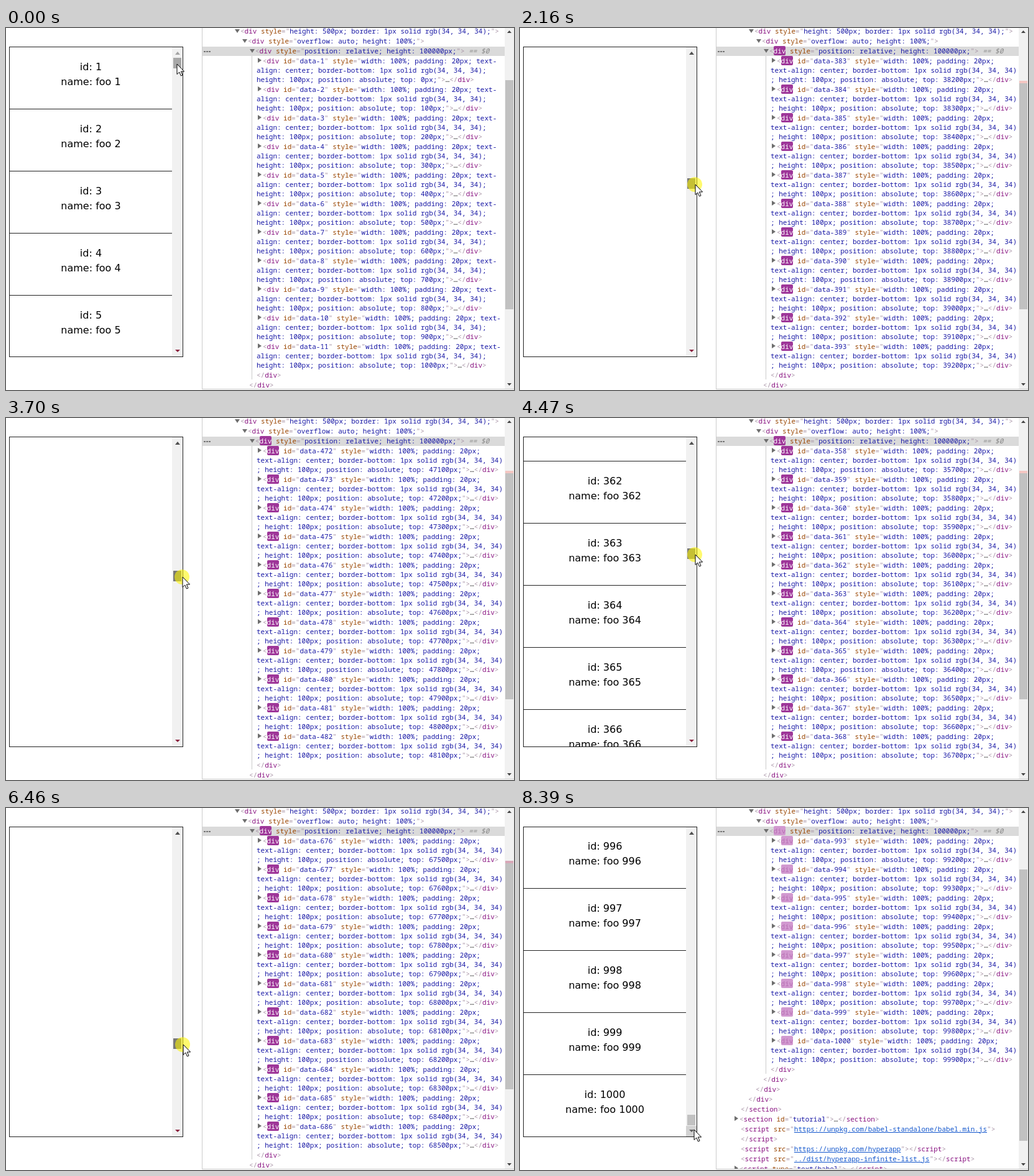
These frames come from a looping animation (817 by 583 pixels, 8460 ms). An HTML page:

```html
<!DOCTYPE html>
<html lang="en">
<head>
<meta charset="utf-8">
<title>Infinite list</title>
<style>
html, body { margin: 0; width: 100%; height: 100%; overflow: hidden; background: #fff; }
div, i, svg { position: absolute; box-sizing: border-box; }
b, em { font-weight: normal; }
#list { left: 5px; top: 30px; width: 280px; height: 500px; border: 1px solid #222; overflow: hidden; }
.row { left: 0; width: 261px; height: 100px; padding-top: 20px; border-bottom: 1px solid #222;
  font: 16px/24px "DejaVu Sans", Verdana, sans-serif; text-align: center; color: #000; }
#track { left: 261px; top: 0; width: 17px; height: 498px; background: #f1f1f1; }
#thumb { left: 2px; width: 13px; height: 17px; }
#tree { left: 315px; top: -1px; width: 502px; height: 583px; border: 1px solid #ccc; border-right: 0; overflow: hidden; }
#code { left: -316px; top: 0; width: 817px; height: 583px;
  font: 11px/15px "Noto Sans Mono", "DejaVu Sans Mono", monospace; }
.line { white-space: pre; color: #222; }
.p { color: #a894a6; } .t { color: #881280; } .a { color: #994500; } .v { color: #1a1aa6; }
.u { color: #1155cc; text-decoration: underline; }
.hot { border-radius: 2px; color: var(--ink); background: var(--glow); }
.line em { color: #888; }
.up { clip-path: polygon(50% 0, 100% 100%, 0 100%); }
.down { clip-path: polygon(0 0, 100% 0, 50% 100%); }
.right { clip-path: polygon(0 0, 100% 50%, 0 100%); }
#bar { left: 486px; top: 0; width: 16px; height: 582px; background: #f1f1f1; }
#halo { width: 24px; height: 24px; border-radius: 50%; background: rgba(255, 246, 0, .57); }
</style>
</head>
<body>
<div id="list">
  <div id="rows"></div>
  <div id="track">
    <div id="button" style="left:0;top:481px;width:17px;height:17px"></div>
    <i id="up" class="up" style="left:5px;top:7px;width:8px;height:5px"></i>
    <i id="down" class="down" style="left:5px;top:487px;width:8px;height:4px"></i>
    <div id="thumb"></div>
  </div>
</div>
<div id="tree">
  <div id="code"></div>
  <div id="bar">
    <i class="up" style="left:4px;top:4px;width:7px;height:4px;background:#444"></i>
    <i class="down" style="left:4px;top:572px;width:7px;height:4px;background:#444"></i>
    <div id="hint" style="left:1px;top:85px;width:13px;height:5px"></div>
    <div id="grip" style="left:1px;width:13px;background:#c1c1c1"></div>
  </div>
</div>
<div id="halo"></div>
<svg id="arrow" width="14" height="22" viewBox="-1 -1 14 22">
  <path d="M0 0V16.5L3.8 13L6.4 19L9 17.9L6.4 12H11.6Z" fill="#fff" stroke="#000"/>
</svg>
<script>
const LOOP = 8460, STEP = 230 / 3, SIZE = 1000, END = 995.01;

// [time, scroll position in rows]
const scrollKeys = [
  [320, 0], [1247, 233.8], [1400, 242.63], [2780, 552.4], [2933.3, 554.27],
  [4313, 360.9], [4466.7, 360.61], [4770, 362], [5003, 362], [5540, 523.5],
  [5616.7, 538.5], [5693.3, 545.36], [7073.3, 877.5], [7150, 890.5],
  [7226.7, 892.62], [7840, END]
];
const pointerKeys = [
  [320, 275], [1400, 277], [2933.3, 285], [4466.7, 282], [5693.3, 284], [7226.7, 285], [8200, 280]
];
const $ = id => document.getElementById(id);
const mix = (a, b, p) => a + (b - a) * p;
const rgb = (a, b, p) => `rgb(${a.map((x, i) => Math.round(mix(x, b[i], p)))})`;
const unit = x => Math.min(1, Math.max(0, x));

// Monotone cubic interpolation
function curve(keys, t) {
  const last = keys.length - 1;
  if (t <= keys[0][0]) return keys[0][1];
  if (t >= keys[last][0]) return keys[last][1];
  const slope = i => (keys[i + 1][1] - keys[i][1]) / (keys[i + 1][0] - keys[i][0]);
  const tangent = i => {
    if (i === 0 || i === last) return 0;
    const a = slope(i - 1), b = slope(i);
    return a * b > 0 ? 2 * a * b / (a + b) : 0;
  };
  const i = keys.findIndex(k => k[0] > t) - 1;
  const [t0, y0] = keys[i], [t1, y1] = keys[i + 1], h = t1 - t0, u = (t - t0) / h, w = 1 - u;
  return y0 * w * w * (1 + 2 * u) + y1 * u * u * (3 - 2 * u)
    + h * u * w * (tangent(i) * w - tangent(i + 1) * u);
}
const scrollAt = t => curve(scrollKeys, t);
const firstRow = t => Math.max(0, Math.floor(scrollAt(t)) - 3);
const treeRow = t => firstRow(t - 2 * STEP);
const indices = first => Array.from({ length: Math.min(11, SIZE - first) }, (_, i) => first + i);

const span = (kind, text) => `<b class="${kind}">${text}</b>`;
const attr = (name, value, kind = 'v') =>
  ' ' + span('a', name) + span('p', '="') + span(kind, value) + span('p', '"');
const open = (name, attrs, kind = 't') => span('p', '&lt;') + span(kind, name) + attrs + span('p', '&gt;');
const close = name => span('p', '&lt;/') + span('t', name) + span('p', '&gt;');
const line = (x, y, html, indent = 0) =>
  `<div class="line" style="left:${x}px;top:${y - 8}px;text-indent:${indent}px">${html}</div>`;
const mark = (x, y, isOpen) => isOpen
  ? `<i class="down" style="left:${x - 9}px;top:${y - 3}px;width:8px;height:6px;background:#6e6e6e"></i>`
  : `<i class="right" style="left:${x - 8}px;top:${y - 5}px;width:6px;height:8px;background:#6e6e6e"></i>`;
const node = (x, y, html, isOpen) => mark(x, y, isOpen) + line(x, y, html);
const box = (x, y, w, h, color) =>
  `<i style="left:${x}px;top:${y}px;width:${w}px;height:${h}px;background:${color}"></i>`;

function item(index, y, kind) {
  const id = index + 1, wide = id >= 100;
  const style = 'width: 100%; padding: 20px; ' + (wide ? '\ntext-align' : 'text-\nalign')
    + ': center; border-bottom: 1px solid rgb(34, 34, 34)' + (wide ? '\n; ' : ';\n')
    + `height: 100px; position: absolute; top: ${index * 100}px;`;
  return mark(413, y) + line(403, y,
    open('div', attr('id', 'data-' + id) + attr('style', style), kind) + '…' + close('div'), 10);
}

function treeHtml(first, kind) {
  const script = src => open('script', attr('src', src, 'u'));
  const items = indices(first);
  let y = 53 + 46 * items.length;
  let html = box(316, 30, 486, 15, '#dadada') + box(395, 45, 1, y - 38, '#ccc')
    + [0, 4, 8].map(d => box(318 + d, 37, 3, 2, '#777')).join('')
    + node(377, 5, open('div', attr('style', 'height: 500px; border: 1px solid rgb(34, 34, 34);')), true)
    + node(389, 21, open('div', attr('style', 'overflow: auto; height: 100%;')), true)
    + node(401, 37, open('div', attr('style', 'position: relative; height: 100000px;'), kind)
      + '<em> == $0</em>', true)
    + items.map((index, i) => item(index, 53 + 46 * i, kind)).join('');
  const put = (x, text) => { html += line(x, y, text); y += 16; };
  [403, 391, 379, 367].forEach(x => put(x, close('div')));
  put(355, close('section'));
  html += mark(353, y);
  put(353, open('section', attr('id', 'tutorial')) + '…' + close('section'));
  put(355, script('https://unpkg.com/babel-standalone/babel.min.js'));
  put(355, close('script'));
  put(355, script('https://unpkg.com/hyperapp') + close('script'));
  put(355, script('../dist/hyperapp-infinite-list.js') + close('script'));
  html += mark(353, y);
  put(353, open('script', attr('type', 'text/babel')) + '…' + close('script'));
  return html;
}

// Time since the tree last changed
function treeAge(t) {
  for (let k = 0; k < 19; k++)
    if (treeRow(t - k * STEP) !== treeRow(t - (k + 1) * STEP)) return k * STEP;
  return Infinity;
}

let treeKey = '';
function draw(time) {
  const t = 1170 + Math.floor((time - 1170) / STEP + .1) * STEP;
  const scroll = scrollAt(t), first = treeRow(t), age = treeAge(t);
  const pressed = time >= 80 && time < 8100, released = time >= 8100;

  $('rows').innerHTML = indices(firstRow(t - STEP)).map(i =>
    `<div class="row" style="top:${Math.round((i - scroll) * 100)}px">id: ${i + 1}<br>name: foo ${i + 1}</div>`
  ).join('');
  const thumbY = Math.round(17 + scroll / END * 446);
  $('thumb').style.top = thumbY + 'px';
  $('thumb').style.background = pressed ? '#787878' : released ? '#c1c1c1' : '#a8a8a8';
  $('up').style.background = scroll > 0 ? '#505050' : '#a3a3a3';
  $('down').style.background = released ? '#606060' : '#8c2440';
  $('button').style.background = released ? '#d2d2d2' : 'none';

  const kind = age < 1400 ? 'hot' : 't', key = first + kind;
  if (key !== treeKey) $('code').innerHTML = treeHtml(first, kind);
  treeKey = key;
  const fade = 1 - (1 - unit(age / 1120)) ** 2.2;
  $('code').style.setProperty('--glow', rgb([158, 54, 153], [245, 219, 244], fade));
  $('code').style.setProperty('--ink', rgb([255, 255, 255], [136, 18, 128], fade));

  const short = unit((11 - indices(first).length) / 3);
  const gripY = mix(first < 99 ? 84 : 89, 99, short);
  $('grip').style.top = gripY + 'px';
  $('grip').style.height = mix(453, 536, short) - gripY + 'px';
  $('hint').style.background = first < 99 || short ? 'none' : time < 6000 ? '#f4c6c2' : '#d8a8b8';

  const x = curve(pointerKeys, t);
  const y = thumbY + 41 + 14 * unit((t - 7760) / 400);
  $('arrow').style.transform = `translate(${Math.round(x) - 1}px, ${Math.round(y) - 1}px)`;
  $('arrow').style.left = $('arrow').style.top = 0;
  $('halo').style.left = Math.round(x) - 13 + 'px';
  $('halo').style.top = Math.round(y) - 12 + 'px';
  $('halo').style.display = pressed ? 'block' : 'none';
}

const start = performance.now();
function tick() {
  draw((performance.now() - start) % LOOP);
  requestAnimationFrame(tick);
}
tick();
</script>
</body>
</html>
```
